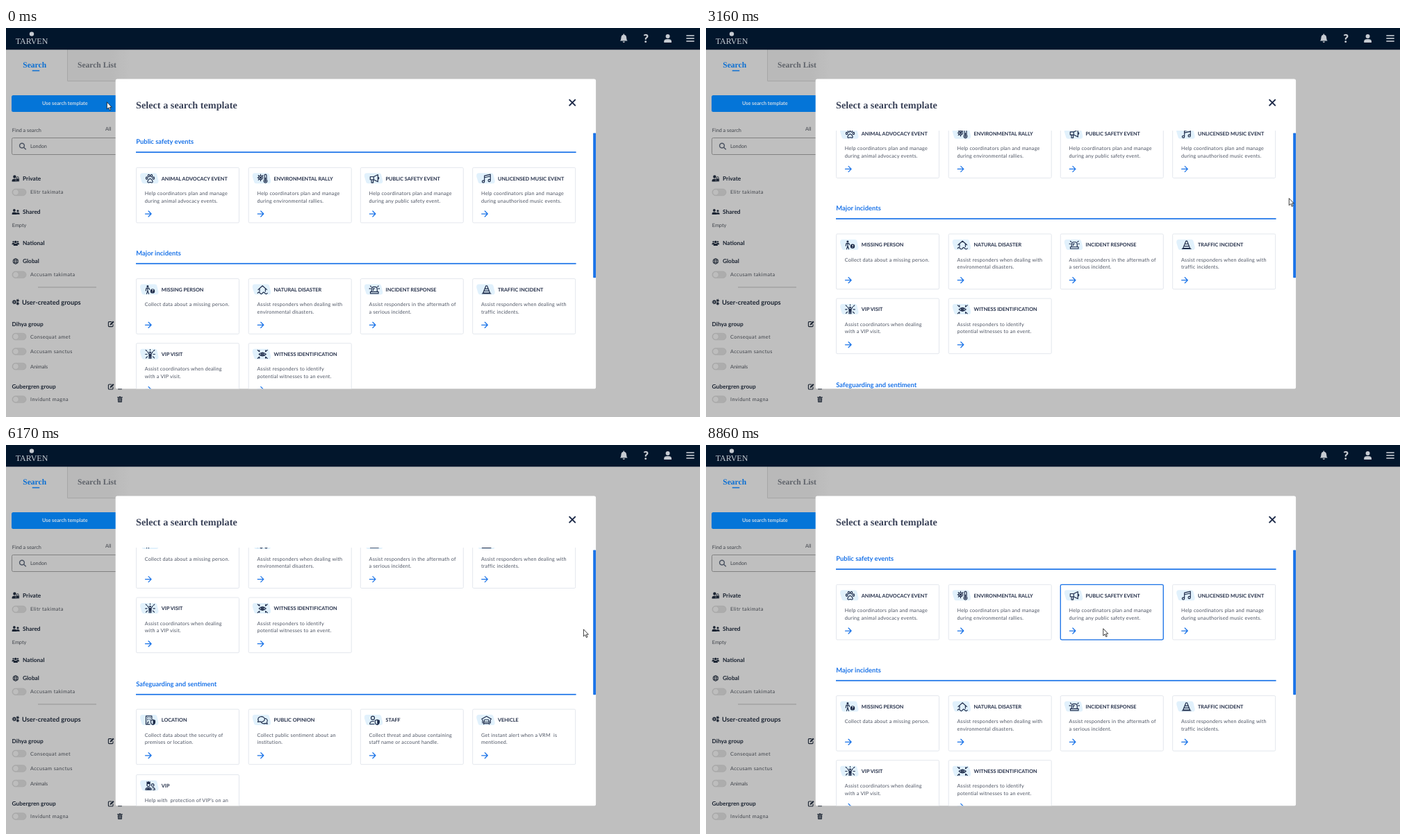
Recreate the animation shown at these times as an HTML page. Size 999 by 561 pixels, loop 8930 ms.

```html
<!DOCTYPE html>
<html lang="en">
<head>
<meta charset="utf-8">
<title>Search templates</title>
<style>
html, body { margin: 0; width: 100%; height: 100%; overflow: hidden; background: #bfbfbf; }
svg { display: block; width: 999px; height: 561px; }
text { font-family: Lato, sans-serif; font-size: 7.28px; white-space: pre; text-rendering: geometricPrecision; }
.serif { font-family: "Liberation Serif", serif; font-weight: 700; font-size: 11.55px; }
.title { font-size: 14.25px; fill: #3a4258; }
.side { fill: #3f434a; }
.wide { letter-spacing: .42px; }
.head { font-weight: 700; font-size: 8.33px; fill: #1b2432; }
.big { font-size: 9.35px; }
.section { font-weight: 700; font-size: 9.37px; fill: #1a73e8; }
.name { font-weight: 700; fill: #25304a; }
.body { fill: #4d5463; letter-spacing: .2px; }
.icon { fill: none; stroke: #1d2b49; stroke-width: 1.15; stroke-linejoin: round; stroke-linecap: round; }
.solid { fill: #1d2b49; }
.dark { fill: #1b2432; }
.line { fill: none; stroke: #1b2432; }
.card { fill: #fff; stroke: #e3e7ed; }
.go { fill: none; stroke: #1a73e8; stroke-width: 1.25; stroke-linecap: round; stroke-linejoin: round; }
</style>
</head>
<body>
<svg id="stage" viewBox="0 0 999 561"></svg>
<script>
const LOOP = 8930;
const BLUE = '#1a73e8';
const COLS = [187.5, 349.2, 510.3, 671.7];

const text = (x, y, s, cls = '', more = '') => `<text x="${x}" y="${y}" class="${cls}" ${more}>${s}</text>`;
const rect = (x, y, w, h, more = '') => `<rect x="${x}" y="${y}" width="${w}" height="${h}" ${more}/>`;
const path = (d, cls = '', more = '') => `<path d="${d}" class="${cls}" ${more}/>`;
const at = (x, y, inner) => `<g transform="translate(${x} ${y})">${inner}</g>`;
const ring = (x, y, r, ry = r) =>
  `M${x - r} ${y}a${r} ${ry} 0 1 0 ${2 * r} 0a${r} ${ry} 0 1 0 ${-2 * r} 0Z`;

// Card icons: [outline, filled parts], centred on 0,0
const SHIELD = 'M1 .5L4-.6 7 .5V3C7 5 5.3 6 4 6.6 2.7 6 1 5 1 3Z';
const HALF = 'M4-.6L7 .5V3C7 5 5.3 6 4 6.6Z';
const ICONS = {
  paw: [ring(-4.9, -.6, 1.2, 1.6) + ring(-1.9, -4, 1.3, 1.8) + ring(1.9, -4, 1.3, 1.8) + ring(4.9, -.6, 1.2, 1.6) +
    'M0 .3C2.5 .3 5 5.5 2.7 5.9 1.5 6 1 5.3 0 5.3S-1.5 6-2.7 5.9C-5 5.5-2.5 .3 0 .3Z'],
  climate: [ring(-2.7, -1.3, 2.8) + 'M-2.7-6v1.5M-2.7 3.5V2M-7-1.3h1.4M-6-4.6l1.1 1M-6 2l1.1-1M.6-4.6l-1.1 1' +
    'M2.8 1.8V-4.5a1.5 1.5 0 0 1 3 0V1.8a2.4 2.4 0 1 1-3 0ZM4.3-1V3', ring(-2.7, -1.3, 1.6) + ring(4.3, 3.7, 1.2)],
  horn: ['M-6-2.6H-1L5-5.6V4.6L-1 1.6H-6ZM-4.2 1.6V6H-1.7V1.6M-1-2.6V1.6M5-2a1.5 1.5 0 0 1 0 3'],
  music: ['M-3 4V-4L5.6-6V2.6M-3-1.4L5.6-3.4' + ring(-4.6, 4.3, 1.6) + ring(4, 2.9, 1.6)],
  missing: ['M-3.6-2.4V1.5L-5 6M-3.6 1.5L-2 6M-6.3 1.4L-5.5-2.2H-1.6L-.9 0', ring(-3.6, -4.9, 1.5) + ring(3.5, 2, 3.2)],
  flood: ['M-6.3 0L0-5.6 6.3 0M-4.2-1.4V2.6M4.2-1.4V2.6M-7 5q1.75-2.4 3.5 0t3.5 0 3.5 0 3.5 0'],
  siren: ['M-4 3V-1a3 3 0 0 1 3-3h2a3 3 0 0 1 3 3V3M-5.8 5.5V3H5.8V5.5ZM-7.2-1.5h1.5M7.2-1.5H5.7M-5.8-5.4l1.2 1.1M5.8-5.4l-1.2 1.1M-1.8 1V-1.5h2'],
  cone: ['M-.8-5.6H.8L5 4.8H-5ZM-6.3 5.6H6.3M-2.4-1.3H2.4M-3.6 1.8H3.6'],
  visit: ['M-3.6-3.6L-1.5-.3V6M3.6-3.6L1.5-.3V6M-1.5-.3H1.5M0 2V6M0-7v1.2M-6.3-6l1.5 1.4M6.3-6L4.8-4.6M-6.8 0h2.3M6.8 0H4.5M-6 5.4l2-2M6 5.4l-2-2', ring(0, -2.7, 1.4) + 'M-1.5-.3h3V3h-3Z'],
  eye: ['M-5 0Q0-5 5 0Q0 5-5 0Z' + ring(0, 0, 2) + 'M-7-6l2.6 2.2v-2M7-6L4.4-3.8v-2M-7 6l2.6-2.2v2M7 6L4.4 3.8v2', ring(0, 0, 1.3)],
  building: ['M-.5 6H-6V-6H2.4V-1.6M-4-3.6h1.2M-.6-3.6H.6M-4-.8h1.2M-.6-.8H.2M-3.6 6V2.6h1.8' + SHIELD, HALF],
  chat: ['M-6.8 2.6L-5.8 .4A4.8 3.8 0 1 1-3.6 2ZM3.6-2.6A4 3.4 0 0 1 6.2 2.9L7 5.3 4.4 4.5A4.8 3.6 0 0 1-1.6 3.4'],
  staff: [ring(-2.3, -3.2, 2.5) + 'M-.3 5.6H-6.6C-6.6 2.4-4.6 1.4-1 1.6' + SHIELD, HALF],
  car: ['M-7-1.6L0-5.6 7-1.6M-4 5.8V2.6L-2.8-.6H2.8L4 2.6V5.8M-4 2.6H4M-4 4.7H4M-5.7-.8V4M5.7-.8V4'],
  vip: [ring(-2.4, -1, 2.2) + 'M-6.6 6Q-6.6 2.8-2.4 2.8T1.8 6ZM3.4 2.8Q6.8 2.8 6.8 6H4' + ring(3.7, -.8, 1.8),
    'M-5-2.6V-6.2l1.3 1 1.3-1.3 1.3 1.3 1.3-1V-2.6ZM-5.6 6Q-5 3.6-2.4 3.6T.8 6Z']
};

const SECTIONS = [[167.4, 'Public safety events'], [328, 'Major incidents'], [582.7, 'Safeguarding and sentiment']];
const ROWS = [
  [201.3, [
    ['paw', 'ANIMAL ADVOCACY EVENT', 'Help coordinators plan and manage', 'during animal advocacy events.'],
    ['climate', 'ENVIRONMENTAL RALLY', 'Help coordinators plan and manage', 'during environmental rallies.'],
    ['horn', 'PUBLIC SAFETY EVENT', 'Help coordinators plan and manage', 'during any public safety event.'],
    ['music', 'UNLICENSED MUSIC EVENT', 'Help coordinators plan and manage', 'during unauthorised music events.']]],
  [361.6, [
    ['missing', 'MISSING PERSON', 'Collect data about a missing person.', ''],
    ['flood', 'NATURAL DISASTER', 'Assist responders when dealing with', 'environmental disasters.'],
    ['siren', 'INCIDENT RESPONSE', 'Assist responders in the aftermath of', 'a serious incident.'],
    ['cone', 'TRAFFIC INCIDENT', 'Assist responders when dealing with', 'traffic incidents.']]],
  [454.7, [
    ['visit', 'VIP VISIT', 'Assist coordinators when dealing', 'with a VIP visit.'],
    ['eye', 'WITNESS IDENTIFICATION', 'Assist responders to identify', 'potential witnesses to an event.']]],
  [615.8, [
    ['building', 'LOCATION', 'Collect data about the security of', 'premises or location.'],
    ['chat', 'PUBLIC OPINION', 'Collect public sentiment about an', 'institution.'],
    ['staff', 'STAFF', 'Collect threat and abuse containing', 'staff name or account handle.'],
    ['car', 'VEHICLE', 'Get instant alert when a VRM  is', 'mentioned.']]],
  [710.2, [['vip', 'VIP', 'Help with  protection of VIP’s on an', 'ongoing basis.']]]
];

function card(x, y, [icon, name, a, b]) {
  const [outline, fill = ''] = ICONS[icon];
  const mark = path(outline, 'icon') + path(fill, 'solid') +
    (icon === 'missing' ? text(3.5, 4, '?', '', 'fill="#fff" text-anchor="middle" style="font-size:5.5px;font-weight:900"') : '');
  return at(x, y,
    rect(0, 0, 148, 79.6, 'rx="1.6" class="card"') +
    path('M9 8H27Q29 8 29.8 10L32 19Q32.3 23 29 23H11Q8.5 23 8 21L5.6 13Q5 8 9 8Z', '', 'fill="#e1f1fc"') +
    at(20, 15.8, mark) +
    text(36.3, 18.3, name, 'name') + text(12.3, 39.8, a, 'body') + text(12.3, 50.3, b, 'body') +
    path('M13 66.7h8.6M17.6 62.7l4 4-4 4', 'go'));
}

function list() {
  const heads = SECTIONS.map(([y, s]) => text(187.3, y, s, 'section') + rect(187, y + 10.9, 633.6, 1.7, `fill="${BLUE}"`));
  const cards = ROWS.map(([y, row]) => row.map((c, i) => card(COLS[i], y, c)).join(''));
  return heads.join('') + cards.join('');
}

const toggle = (y, s, cls = 'wide') =>
  rect(9, y - 4.8, 20, 9.6, 'rx="4.8" fill="#adadad" stroke="#a2a2a2" stroke-width=".6"') +
  `<circle cx="14" cy="${y}" r="4.3" fill="#bdbdbd" stroke="#a2a2a2" stroke-width=".6"/>` +
  text(35, y + 2.5, s, 'side ' + cls);

const person = (x, y, k) => at(x, y, `<g transform="scale(${k})">` +
  path(ring(0, -2.6, 2.2) + 'M-3.8 4.4V3Q-3.8 .4 0 .4T3.8 3V4.4Z', 'dark') + '</g>');
const gear = (x, y, r) => `<circle cx="${x}" cy="${y}" r="${r}" class="line" stroke-width="1.5"/>` +
  `<circle cx="${x}" cy="${y}" r="${r + 1.1}" class="line" stroke-width="1" stroke-dasharray="1 1.1"/>`;
const edit = y => at(151, y, path('M1-3H-2.6Q-3.6-3-3.6-2V3Q-3.6 4-2.6 4H2Q3 4 3 3V.6', 'line', 'stroke-width="1.1"') +
  path('M-1.4 2L-1 .1 3-4 4.6-2.5 .5 1.6Z', 'dark'));
const trash = y => at(164, y, path('M-3.8-3.6H-1.2L-.7-4.3H.7L1.2-3.6H3.8V-2.6H-3.8ZM-3.2-2H3.2L2.8 4.3H-2.8Z', 'dark') +
  path('M-1.4-1V3.2M0-1V3.2M1.4-1V3.2', '', 'stroke="#bfbfbf" stroke-width=".6"'));

function sidebar() {
  return rect(88, 31, 90, 45.5, 'fill="url(#fade)"') +
    path('M88.5 31V76.5H160', '', 'fill="none" stroke="#a6a6a6"') +
    text(24.3, 57.3, 'Search', 'serif', 'fill="#0b6fd3"') + rect(37.8, 60.8, 10.4, 1.5, 'fill="#0b6fd3"') +
    text(103, 57.3, 'Search List', 'serif', 'fill="#5f636a"') +
    rect(8, 97, 160, 24, 'rx="2.5" fill="#0475d8"') +
    text(52, 111.4, 'Use search template', '', 'fill="#cbd9e6" font-weight="700"') +
    text(8.8, 149.5, 'Find a search', 'side') + text(143, 148.3, 'All', 'side') +
    rect(8.5, 158.5, 160, 24, 'rx="2" fill="none" stroke="#818181"') +
    path(ring(23, 169.6, 3.4) + 'M25.6 172.2L28.8 175.2', 'line', 'stroke-width="1.4" style="stroke:#4a5260"') +
    text(35, 173, 'London', 'side') +
    person(12.4, 217, 1) + rect(14.2, 217, 5, 4.4, 'rx=".6" class="dark" stroke="#bfbfbf" stroke-width=".5"') +
    path('M15.4 217v-1.2a1.3 1.3 0 0 1 2.6 0V217', 'line', 'stroke-width=".9"') +
    text(24, 220, 'Private', 'head') + toggle(236.9, 'Elitr takimata') +
    person(11.9, 265.2, .85) + person(17, 265.6, .7) + text(24, 268.2, 'Shared', 'head') + text(8.8, 287.2, 'Empty', 'side') +
    person(10.6, 309.8, .55) + person(17, 309.8, .55) + person(13.8, 310.6, .8) + text(24, 313.2, 'National', 'head') +
    path(ring(13.8, 336.4, 3.8) + ring(13.8, 336.4, 1.7, 3.8) + 'M10 335h7.6M10 337.8h7.6', 'line', 'stroke-width=".9"') +
    text(24, 339.4, 'Global', 'head') + toggle(355.8, 'Accusam takimata') +
    rect(46, 373.4, 84, 1, 'fill="#949494"') +
    gear(11.9, 395.2, 1.7) + gear(16.8, 393, .8) + gear(16.8, 397.4, .8) +
    text(23, 398.6, 'User-created groups', 'head big') +
    text(8.6, 429.6, 'Dihya group', 'head') + edit(426.6) +
    toggle(445, 'Consequat amet') + toggle(466.5, 'Accusam sanctus') + toggle(488, 'Animals', '') +
    text(8.6, 520, 'Gubergren group', 'head') + edit(517) + trash(517) +
    toggle(535.5, 'Invidunt magna') + trash(535.5);
}

function header() {
  const ink = 'fill="#c6cbd2"';
  return rect(0, 0, 999, 31.3, 'fill="#02162c"') +
    `<circle cx="37" cy="8.6" r="3.2" ${ink}/>` +
    text(37, 23.4, 'TARVEN', '', `${ink} text-anchor="middle" style="font:12px 'Liberation Serif',serif"`) +
    at(889.3, 15, path('M-5.4 3.6Q-3.8 2-3.8-1.2Q-3.6-4.6-.7-5.2V-6.4H.7V-5.2Q3.6-4.6 3.8-1.2Q3.8 2 5.4 3.6ZM-1.6 4.5H1.6A1.6 1.6 0 0 1-1.6 4.5Z', '', ink)) +
    text(921.2, 20.7, '?', '', `${ink} text-anchor="middle" style="font-size:16.5px;font-weight:900"`) +
    at(952.6, 15, path(ring(0, -2.9, 3) + 'M-5.4 6V4.2Q-5.4 1 0 1T5.4 4.2V6Z', '', ink)) +
    [10.2, 14.2, 18.2].map(y => rect(979.3, y, 11.4, 1.6, ink)).join('');
}

document.getElementById('stage').innerHTML = `
  <defs>
    <linearGradient id="fade"><stop offset=".7" stop-color="#b9b9b9"/><stop offset="1" stop-color="#bfbfbf"/></linearGradient>
    <clipPath id="view">${rect(158, 148, 691, 372.2)}</clipPath>
  </defs>
  ${rect(0, 0, 999, 561, 'fill="#bfbfbf"')}
  ${sidebar()}${header()}
  ${rect(157.7, 73.6, 691.4, 446.7, 'rx="2.6" fill="#fff"')}
  ${text(187, 116.2, 'Select a search template', 'serif title')}
  ${path('M811.2 103.6l8 8M819.2 103.6l-8 8', '', 'stroke="#1d2b49" stroke-width="2" stroke-linecap="round"')}
  <g clip-path="url(#view)"><g id="list">${list()}</g></g>
  ${rect(845.2, 151.4, 3.9, 208.8, `rx=".8" fill="${BLUE}"`)}
  ${rect(0, ROWS[0][0], 148, 79.6, `id="hover" rx="1.8" fill="none" stroke="${BLUE}" stroke-width="1.3"`)}
  ${path('M0 0V10.2L2.4 8 4 11.8 5.6 11.1 4 7.4H7Z', '', 'id="cursor" fill="#fff" stroke="#111" stroke-width=".8" stroke-linejoin="round"')}`;

// time, x, y of the pointer tip
const MOVES = [
  [320, 145.3, 106.8], [600, 205, 140], [860, 318, 198], [1060, 420, 234], [1260, 484, 245], [1330, 505, 246],
  [1640, 582, 245], [1960, 648.2, 243], [2170, 700, 242], [2420, 782, 243], [2700, 839.3, 245.6],
  [3160, 839.3, 245.6], [3560, 840.3, 251], [3640, 840.3, 251], [4240, 832, 264.8], [4430, 832, 264.8], [4500, 831.4, 265.8],
  [7710, 831.4, 265.8], [7850, 822, 290], [8060, 770, 322], [8260, 686, 322], [8460, 612, 294],
  [8660, 568.6, 271.5], [8860, 571.8, 264.8]
];
// wheel ticks: time, offset
const TICKS = [[0, 0], [3160, 64.6], [3430, 129.2], [3700, 193.8], [3970, 258.4], [4240, 299.5],
  [6170, 234.7], [6440, 170.1], [6700, 105.5], [7040, 40.9], [7100, 0]];
const STEP = 67;

function pointer(t) {
  const i = MOVES.findIndex(m => m[0] > t);
  if (i === 0) return MOVES[0].slice(1);
  if (i < 0) return MOVES[MOVES.length - 1].slice(1);
  const [t0, x0, y0] = MOVES[i - 1], [t1, x1, y1] = MOVES[i];
  const n = Math.max(1, Math.round((t1 - t0) / STEP));
  const p = Math.floor((t - t0) / (t1 - t0) * n) / n;
  return [x0 + (x1 - x0) * p, y0 + (y1 - y0) * p];
}

const [listEl, hoverEl, cursorEl] = ['list', 'hover', 'cursor'].map(id => document.getElementById(id));

function draw(t) {
  const offset = TICKS.filter(k => k[0] <= t).pop()[1];
  const [x, y] = pointer(t);
  const top = ROWS[0][0];
  const over = y > top && y < top + 79.6 ? COLS.find(c => x > c && x < c + 148) : undefined;
  listEl.setAttribute('transform', `translate(0 ${-offset})`);
  cursorEl.setAttribute('transform', `translate(${x} ${y})`);
  hoverEl.setAttribute('visibility', over ? 'visible' : 'hidden');
  if (over) hoverEl.setAttribute('x', over);
}

const start = performance.now();
function tick() {
  draw((performance.now() - start) % LOOP);
  requestAnimationFrame(tick);
}
tick();
</script>
</body>
</html>
```
